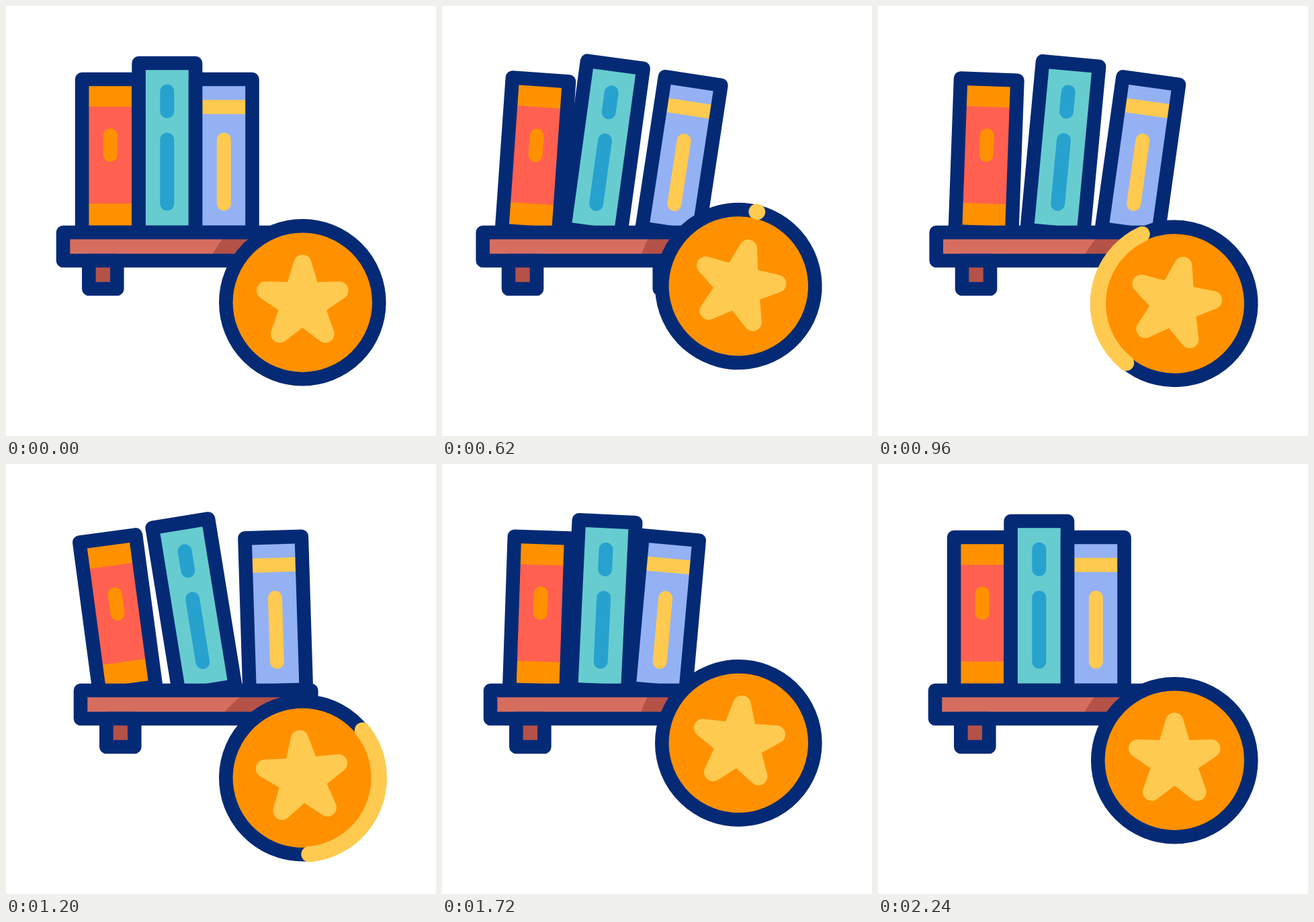
An HTML page with a canvas that plays this animation: 640 px wide and 640 px high, repeating every 2.4 s.

```html
<!DOCTYPE html>
<html lang="en">
<head>
<meta charset="utf-8">
<title>Bookshelf</title>
<style>
  html, body { margin: 0; width: 100%; height: 100%; overflow: hidden; background: #fff; }
  canvas { display: block; width: 640px; height: 640px; }
</style>
</head>
<body>
<canvas id="stage" width="640" height="640"></canvas>
<script>
const ctx = document.getElementById('stage').getContext('2d');
const LOOP = 2400, LINE = 20.6, FLOOR = 337;
const NAVY = '#052a75', ORANGE = '#ff9100', YELLOW = '#feca50', RED = '#ff6050',
      TEAL = '#67ccd0', BLUE = '#27a2cf', LILAC = '#94b1f4', WOOD = '#d66e60', SHADE = '#b45248';

// Key times shared by all slides and all swings
const SLIDE = [200, 700, 1200, 1700, 2200];
const SWING = [200, 800, 1400, 1800, 2240];

const ease = (t, from, to) => {
  const x = Math.min(1, Math.max(0, (t - from) / (to - from)));
  return x * x * (3 - 2 * x);
};

// Eased value that starts and ends at 0 and passes through the given peaks
function track(t, times, peaks) {
  const values = [0, ...peaks, 0];
  return values.reduce((sum, v, i) =>
    i ? sum + (v - values[i - 1]) * ease(t, times[i - 1], times[i]) : 0, 0);
}

const books = [
  { x: 155.3, top: 109, fill: RED, slide: [0, 0, 0], swing: [5.1, -12, 3.5],
    bands: [[ORANGE, 118, 150], [ORANGE, 294, 328]], pills: [[ORANGE, 192.7, 221.5]] },
  { x: 239.8, top: 85, fill: TEAL, slide: [8.8, 33.8, 7.3], swing: [9.9, -15.8, 4.8],
    bands: [], pills: [[BLUE, 127, 156.5], [BLUE, 199, 294.3]] },
  { x: 324.3, top: 109, fill: LILAC, slide: [42.2, 54.4, 9], swing: [11, -6.2, 6.4],
    bands: [[YELLOW, 139.7, 160.8]], pills: [[YELLOW, 199, 294.3]] }
];

function place(x, y, degrees, draw) {
  ctx.save();
  ctx.translate(x, y);
  ctx.rotate(degrees * Math.PI / 180);
  draw();
  ctx.restore();
}

function stroke(color, width = LINE) {
  ctx.strokeStyle = color;
  ctx.lineWidth = width;
  ctx.stroke();
}

function rect(color, x, y, w, h) {
  ctx.fillStyle = color;
  ctx.fillRect(x, y, w, h);
}

function outline(x, y, w, h) {
  ctx.beginPath();
  ctx.rect(x, y, w, h);
  stroke(NAVY);
}

function disc(color, x, y, r) {
  ctx.beginPath();
  ctx.arc(x, y, r, 0, 7);
  ctx.fillStyle = color;
  ctx.fill();
}

function drawBook(b, t, shelfX) {
  const x = b.x + shelfX + track(t, SLIDE, b.slide);
  place(x, FLOOR, track(t, SWING, b.swing), () => {
    const half = 42.2, height = FLOOR - b.top;
    rect(b.fill, -half, -height, 2 * half, height);
    for (const [color, y0, y1] of b.bands) rect(color, -half, y0 - FLOOR, 2 * half, y1 - y0);
    for (const [color, y0, y1] of b.pills) {
      ctx.beginPath();
      ctx.moveTo(0, y0 - FLOOR);
      ctx.lineTo(0, y1 - FLOOR);
      stroke(color, 21);
    }
    outline(-half, -height, 2 * half, height);
  });
}

function drawShelf(x, badgeY) {
  const left = 85 + x, width = 343.3;
  ctx.save();
  ctx.beginPath();
  ctx.rect(left, FLOOR, width, 42);
  ctx.clip();
  rect(WOOD, left, FLOOR, width, 42);
  disc(SHADE, 441.3, badgeY, 152);
  ctx.restore();
  outline(left, FLOOR, width, 42);
  for (const legX of [left + 38.3, left + width - 80.3]) {
    rect(SHADE, legX, 379, 42, 42);
    outline(legX, 379, 42, 42);
  }
}

function drawStar() {
  ctx.beginPath();
  for (let i = 0; i < 10; i++) {
    const r = i % 2 ? 20.6 : 57.7, a = i * Math.PI / 5;
    ctx.lineTo(r * Math.sin(a), -r * Math.cos(a));
  }
  ctx.closePath();
  ctx.fillStyle = YELLOW;
  ctx.fill();
  stroke(YELLOW, 26.8);
}

function drawBadge(t, y) {
  place(441.3, y, track(t, SWING, [18.2, -12, 7]), () => {
    disc(ORANGE, 0, 0, 114);
    stroke(NAVY);
    drawStar();
    if (t > 600 && t < 1600) {
      const turn = 2 * Math.PI, top = -turn / 4;
      const head = ease(t, 600, 1400), tail = ease(t, 800, 1600);
      ctx.beginPath();
      ctx.arc(0, 0, 114, top - tail * turn, top - head * turn, true);
      stroke(YELLOW, 23.4);
    }
  });
}

function frame() {
  const t = performance.now() % LOOP;
  const shelfX = track(t, SLIDE, [-26, 26, -13]);
  const badgeY = 441.2 + track(t, SLIDE, [-26, 26, -26]);
  rect('#fff', 0, 0, 640, 640);
  ctx.lineJoin = ctx.lineCap = 'round';
  for (const b of books) drawBook(b, t, shelfX);
  drawShelf(shelfX, badgeY);
  drawBadge(t, badgeY);
  requestAnimationFrame(frame);
}
frame();
</script>
</body>
</html>
```
